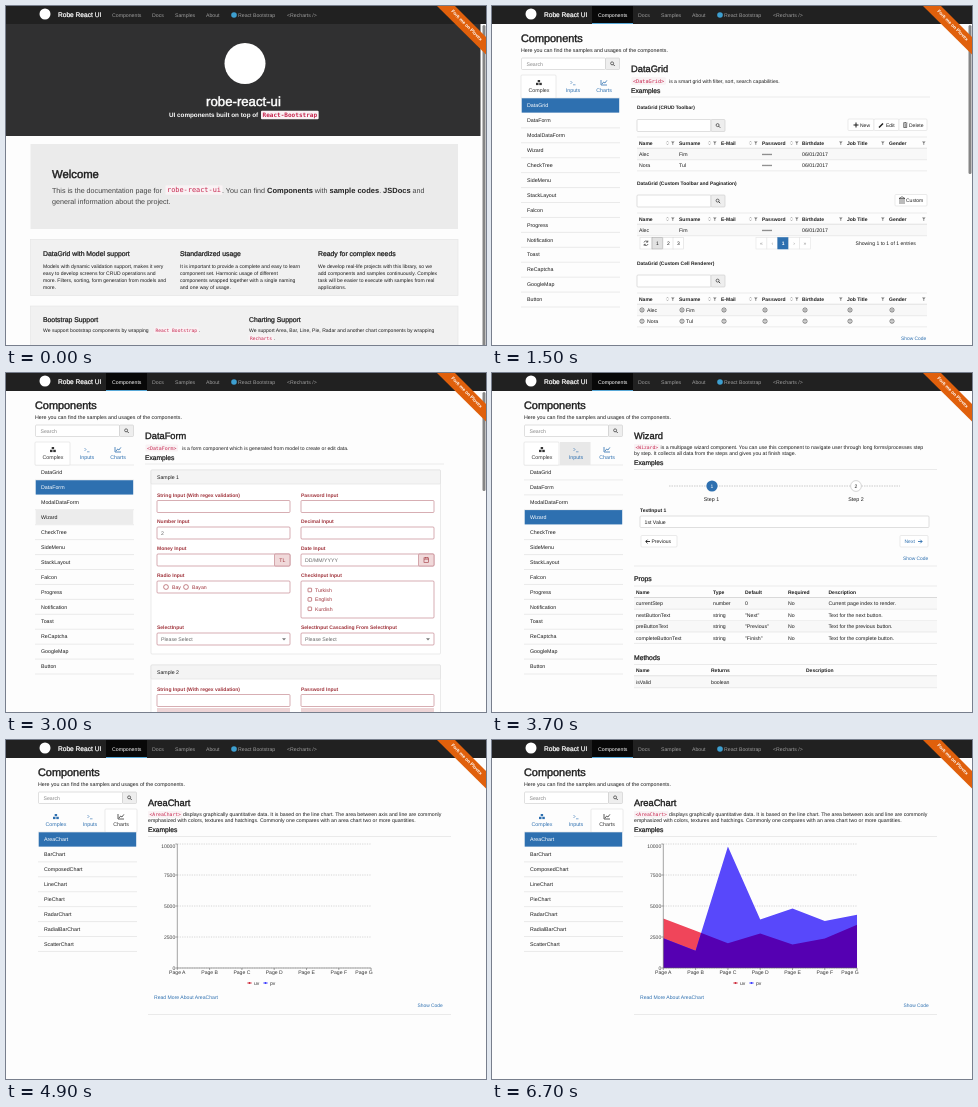
Animation, 480 px wide and 339 px high, one loop 6.8 s. Source, as an HTML page:

```html
<!DOCTYPE html>
<html lang="en">
<head>
<meta charset="utf-8">
<title>Component library tour</title>
<style>
html, body { margin: 0; width: 100%; height: 100%; overflow: hidden; background: #fdfdfd; }
svg { display: block; width: 480px; height: 339px; }
text { font-family: "Liberation Sans", Arial, sans-serif; text-rendering: geometricPrecision; white-space: pre; }
.mono { font-family: "DejaVu Sans Mono", monospace; }
.bold { font-weight: 700; }
.medium { stroke: currentColor; stroke-width: .036em; }
.reveal { animation: reveal 6800ms infinite; }
@keyframes reveal {
  0%, 72.94% { clip-path: inset(0 100% 0 0); animation-timing-function: ease; }
  95%, 100% { clip-path: inset(0 0 0 0); }
}
</style>
</head>
<body>
<svg id="stage" viewBox="0 0 480 339" xmlns="http://www.w3.org/2000/svg"></svg>
<script>
const LOOP = 6800;
const TO_GRID = 1100, TO_FORM = 2500, TO_WIZARD = 3250, TO_CHARTS = 4400, TO_AREA = 4850;
const BLUE = '#2e70b0', RED = '#a0343c', CODE = '#c7254e', INK = '#1c1c1c', RULE = '#ddd';
const rules = [];
const many = (list, fn) => list.map(fn).join('');

// y is the vertical middle of the line
function text(x, y, str, size = 5.2, fill = INK, cls = '', anchor = 'start') {
  const safe = str.replace(/</g, '&lt;').replace(/\[b\](.*?)\[\/b\]/g, '<tspan font-weight="700" font-size="7.5" fill="#222">$1</tspan>');
  return `<text x="${x}" y="${y + size * .35}" font-size="${size}" fill="${fill}" color="${fill}" class="${cls}" text-anchor="${anchor}">${safe}</text>`;
}
const mid = (x, y, str, size, fill, cls) => text(x, y, str, size, fill, cls, 'middle');
const bold = (x, y, str, size = 5, fill = INK) => text(x, y, str, size, fill, 'bold');
const medium = (x, y, str, size, fill = INK) => text(x, y, str, size, fill, 'medium');
function rect(x, y, w, h, fill = '#fff', stroke = 'none', r = 0) {
  return `<rect x="${x}" y="${y}" width="${w}" height="${h}" fill="${fill}" stroke="${stroke}" stroke-width=".6" rx="${r}"/>`;
}
const path = (d, stroke = INK, w = .6, extra = '') =>
  `<path d="${d}" fill="none" stroke="${stroke}" stroke-width="${w}" ${extra}/>`;
const line = (x1, x2, y, stroke = RULE, extra = '') => path(`M${x1} ${y}H${x2}`, stroke, .6, extra);
const dot = (x, y, r, fill, stroke = 'none') =>
  `<circle cx="${x}" cy="${y}" r="${r}" fill="${fill}" stroke="${stroke}" stroke-width=".6"/>`;
function code(x, y, str, size = 4.6, bg = '#f9f2f4', cls = 'mono') {
  const w = str.length * size * .602;
  return rect(x - 1.5, y - size * .7, w + 3, size * 1.4, bg, 'none', 1) + text(x, y, str, size, CODE, cls);
}
const scrollbar = h => rect(476.5, 19, 3, h, '#858585', 'none', 1.5);

// Visible from one time to another within the loop
function during(from, to, body) {
  const name = 'w' + rules.length;
  const pc = t => (t / LOOP * 100).toFixed(3) + '%';
  const start = from ? `0%{visibility:hidden}${pc(from)}{visibility:visible}` : '0%{visibility:visible}';
  const end = to < LOOP ? `${pc(to)},100%{visibility:hidden}` : '100%{visibility:visible}';
  rules.push(`@keyframes ${name}{${start}${end}}.${name}{animation:${name} ${LOOP}ms step-end infinite}`);
  return `<g class="${name}">${body}</g>`;
}

const magnifier = (x, y) => dot(x - .4, y - .4, 1.5, 'none', INK) + path(`M${x + .7} ${y + .7}l1.5 1.5`, INK, .8);
function search(x, y, w, h, hint = '') {
  return rect(x, y, w, h, '#fff', '#ccc', 1) + rect(x + w, y, 14, h, '#eee', '#ccc', 1) +
    magnifier(x + w + 7, y + h / 2) + text(x + 5, y + h / 2, hint, 5.2, '#888');
}
const button = (x, y, w, label, pad, fill = INK) =>
  rect(x, y, w, 11.5, '#fff', '#ddd', 1) + text(x + pad, y + 6, label, 5, fill);

function navbar() {
  const items = [[106, 'Components'], [146, 'Docs'], [169, 'Samples'], [200, 'About'], [232, 'React Bootstrap'], [281, '<Recharts />']];
  return rect(0, 0, 480, 18, '#212121') + dot(39, 8, 5.5, '#fff') +
    medium(52, 8.7, 'Robe React UI', 6.6, '#fff') +
    many(items, ([x, s]) => text(x, 9, s, 5.2, '#9d9d9d')) + dot(228, 9, 2.8, '#3d9fd0') +
    during(TO_GRID, LOOP, rect(100, 0, 41, 18, '#080808') + rect(100, 17, 41, 1, '#58a9d8') + text(106, 9, 'Components', 5.2, '#fff'));
}
const ribbon = () => '<path d="M431 0H449L480 31V48.5Z" fill="#e0600c"/>' +
  '<g transform="translate(460.5 19.5) rotate(45)">' + mid(0, -.5, 'Fork me on Plovex', 4.7, '#fff', 'bold') + '</g>';

function home() {
  const cols = [
    [37, 'DataGrid with Model support', ['Models with dynamic validation support, makes it very', 'easy to develop screens for CRUD operations and', 'more. Filters, sorting, form generation from models and', 'more.']],
    [174, 'Standardized usage', ['It is important to provide a complete and easy to learn', 'component set. Harmonic usage of different', 'components wrapped together with a single naming', 'and one way of usage.']],
    [312, 'Ready for complex needs', ['We develop real-life projects with this library, so we', 'add components and samples continuously. Complex', 'task will be easier to execute with samples from real', 'applications.']]
  ];
  return rect(0, 18, 474.5, 112, '#303031') + dot(239, 57.5, 20.5, '#fff') +
    mid(237.5, 95.5, 'robe-react-ui', 13.2, '#fff', 'medium') +
    bold(163, 109, 'UI components built on top of', 6.3, '#fff') + code(256.5, 109, 'React-Bootstrap', 6.05, '#f9f2f4', 'mono bold') +
    rect(24.5, 138, 427.5, 85, '#ebebeb') + medium(46, 168.5, 'Welcome', 11.3) +
    text(46, 184, 'This is the documentation page for', 7.17, '#444') + code(161, 184, 'robe-react-ui', 6.9) +
    text(216, 184, '. You can find [b]Components[/b] with [b]sample codes[/b]. [b]JSDocs[/b] and', 7.17, '#444') +
    text(46, 195, 'general information about the project.', 7.17, '#444') +
    rect(24.5, 233.5, 427.5, 56, '#f1f1f1', '#e3e3e3') +
    many(cols, ([x, h, ls]) => medium(x, 248, h, 6.85) + many(ls, (s, i) => text(x, 260 + i * 7.1, s, 5.05))) +
    rect(24.5, 300, 427.5, 42, '#f1f1f1', '#e3e3e3') +
    medium(37, 314, 'Bootstrap Support', 6.85) + medium(243, 314, 'Charting Support', 6.85) +
    text(37, 324.5, 'We support bootstrap components by wrapping', 5.05) + code(149.5, 324.5, 'React Bootstrap') + text(193, 324.5, '.', 5.05) +
    text(243, 324.5, 'We support Area, Bar, Line, Pie, Radar and another chart components by wrapping', 5.05) +
    code(244, 332, 'Recharts') + text(268, 332, '.', 5.05) + scrollbar(322);
}

const COMPLEX = ['DataGrid', 'DataForm', 'ModalDataForm', 'Wizard', 'CheckTree', 'SideMenu', 'StackLayout', 'Falcon', 'Progress', 'Notification', 'Toast', 'ReCaptcha', 'GoogleMap', 'Button'];
const CHARTS = ['Area', 'Bar', 'Composed', 'Line', 'Pie', 'Radar', 'RadialBar', 'Scatter'].map(s => s + 'Chart');
const ROW = 14.93;
const rowBox = (x, i, fill) => rect(x + .7, 92.3 + i * ROW, 97.5, ROW - .6, fill);

const tabIcons = [
  (x, c) => rect(x - 1.3, 74, 2.4, 2.2, c) + rect(x - 3, 76.8, 2.5, 2.3, c) + rect(x + .3, 76.8, 2.5, 2.3, c),
  (x, c) => path(`M${x - 2.5} 75l1.5 1.5l-1.5 1.5M${x} 78.8h2.5`, c),
  (x, c) => path(`M${x - 3} 74v5h6M${x - 2} 78l1.7-2l1.2 1l2-2.6`, c, .8)
];
function sidebar(x, items, tab, picked) {
  const left = [0, 35.5, 67], width = [35, 31, 32], centre = [18, 52, 83];
  return medium(x, 31.7, 'Components', 10.9) + text(x, 44, 'Here you can find the samples and usages of the components.', 5.3) +
    search(x + .5, 52, 84, 11.5, 'Search') + line(x, x + 99, 92) +
    rect(x + left[tab], 69, width[tab], 23.2, '#fff', RULE, 1) +
    many(['Complex', 'Inputs', 'Charts'], (s, i) => {
      const c = i === tab ? '#333' : BLUE;
      return tabIcons[i](x + centre[i], c) + mid(x + centre[i], 84, s, 5.3, c);
    }) +
    many(items, (s, i) => (i === picked ? rowBox(x, i, BLUE) : line(x, x + 99, 92 + (i + 1) * ROW)) +
      text(x + 6, 99.3 + i * ROW, s, 5.3, i === picked ? '#fff' : INK));
}

const headline = (x, s) => medium(x, 63, s, 9.3);
const funnel = (x, y) => `<path d="M${x} ${y - 1.5}h3.6l-1.4 1.6v2l-.8-.4v-1.6z" fill="#777"/>`;
const sorter = (x, y) => path(`M${x} ${y - .6}l1-1.2l1 1.2M${x} ${y + .6}l1 1.2l1-1.2`, '#777', .5);
const smiley = (x, y) => dot(x, y, 2.1, 'none', '#333') + dot(x - .7, y - .6, .35, '#333') + dot(x + .7, y - .6, .35, '#333') + path(`M${x - 1} ${y + .5}q1 1 2 0`, '#333', .4);

const COLS = [[147, 'Name'], [187, 'Surname'], [229, 'E-Mail'], [270, 'Password'], [310, 'Birthdate'], [355, 'Job Title'], [397, 'Gender']];
const PEOPLE = [['Alec', 'Fim'], ['Nora', 'Tul']];
function gridTable(y, people, faces) {
  const ends = [183, 225, 266, 307, 351, 393, 434];
  return line(145, 435, y - 6) + line(145, 435, y + 5.3, '#bbb') +
    many(COLS, ([x, s], i) => bold(x, y, s) + funnel(ends[i] - 4, y) + (i < 4 ? sorter(ends[i] - 8.5, y) : '')) +
    many(people, ([first, last], i) => {
      const r = y + 11 + i * 11.2;
      return (i % 2 ? '' : rect(145, r - 5.4, 290, 11, '#f8f8f8')) + line(145, 435, r + 5.7) +
        (faces ? many(COLS, ([x]) => smiley(x + 3, r)) + text(155, r, first) + text(194, r, last)
          : text(147, r, first) + text(187, r, last) + text(270, r + .8, '*****') + text(310, r, '06/01/2017'));
    });
}
function gridPage() {
  return headline(139, 'DataGrid') + code(141, 75, '<DataGrid>', 5.2) +
    text(177, 75, 'is a smart grid with filter, sort, search capabilities.', 5.1) +
    medium(139, 85, 'Examples', 6.7) + line(139, 438, 91) +
    bold(145, 101, 'DataGrid (CRUD Toolbar)', 4.85) + search(145, 113.5, 74, 12) +
    button(356, 113, 26, 'New', 12) + path('M361.5 119h5M364 116.5v5', INK, 1) +
    button(382, 113, 25, 'Edit', 12) + path('M387 121.5l4-4', INK, 1.5) +
    button(407, 113, 28, 'Delete', 10) + path('M411 117h4.4M412.5 116.5h1.4M411.7 117.5v4h3v-4M413.2 118v3') +
    gridTable(137, PEOPLE) +
    bold(145, 177, 'DataGrid (Custom Toolbar and Pagination)', 4.95) + search(145, 189, 74, 12) +
    button(403, 188.5, 32, 'Custom', 11) + path('M407 192.5l3-1.8l3 1.8zM408 193v3M410 193v3M412 193v3M407 197h6') +
    gridTable(213, PEOPLE.slice(0, 1)) +
    many([148, 160, 171, 181], (x, i) => rect(x, 231.5, i ? 10.5 : 12, 11.5, i === 1 ? '#e2e2e2' : '#fff', i === 1 ? '#aaa' : '#ddd') + mid(x + 5.3, 237.3, i ? String(i) : '', 5)) +
    path('M152 236.5a2 2 0 0 1 3.7-.5M156 238a2 2 0 0 1-3.7 .5M155.8 234.5v1.7h-1.7M152.2 240v-1.7h1.7') +
    many(['«', '‹', '1', '›', '»'], (s, i) => rect(264 + i * 10.9, 231.5, 10.9, 11.5, i === 2 ? BLUE : '#fff', i === 2 ? BLUE : '#e5e5e5') +
      mid(269.4 + i * 10.9, 237.2, s, 5, i === 2 ? '#fff' : '#888', i === 2 ? 'bold' : '')) +
    text(363.5, 237, 'Showing 1 to 1 of 1 entries', 5.1) +
    bold(145, 257, 'DataGrid (Custom Cell Renderer)', 4.95) + search(145, 269, 74, 12) +
    gridTable(293, PEOPLE, true) + text(409, 332, 'Show Code', 4.9, BLUE) + scrollbar(149);
}

function field(x, y, label, value = '', addon = '') {
  const w = 133;
  return bold(x, y, label, 5, RED) + rect(x, y + 5.5, w, 12, '#fff', '#bd7880', 1) + text(x + 4, y + 11.7, value, 5.2, '#666') +
    (addon ? rect(x + w - 15.5, y + 5.5, 15.5, 12, '#f0d9da', '#bd7880', 1) : '') + (addon === 'TL' ? mid(x + w - 7.7, y + 11.7, 'TL', 5.2, RED) : '');
}
function formPage() {
  const L = 151, R = 295;
  const caret = x => `<path d="M${x} 265.2h4l-2 2.4z" fill="#777"/>`;
  const sample = (y, h, s) => rect(145, y, 289.5, h, '#fff', RULE, 1) + rect(145, y, 289.5, 14, '#f4f4f4', RULE, 1) + text(151, y + 7.2, s);
  return headline(139, 'DataForm') + code(141, 75, '<DataForm>', 4.9) +
    text(176, 75, 'is a form component which is generated from model to create or edit data.', 5.1) +
    medium(139, 85, 'Examples', 6.7) + line(139, 438, 91) +
    sample(97, 184, 'Sample 1') +
    field(L, 122, 'String Input (With regex validation)') + field(R, 122, 'Password Input') +
    field(L, 148.5, 'Number Input', '2') + field(R, 148.5, 'Decimal Input') +
    field(L, 175.5, 'Money Input', '', 'TL') + field(R, 175.5, 'Date Input', 'DD/MM/YYYY', 'cal') +
    rect(418, 184.8, 4.6, 4.6, 'none', RED) + path('M418 186.2h4.6M419.5 184v1.5M421.2 184v1.5', RED) +
    field(L, 202.5, 'Radio Input') + dot(160, 214, 2.4, '#fff', RED) + text(166, 214, 'Bay', 5.2, RED) + dot(180, 214, 2.4, '#fff', RED) + text(186, 214, 'Bayan', 5.2, RED) +
    bold(R, 202.5, 'CheckInput Input', 5, RED) + rect(R, 208, 133, 37, '#fff', '#bd7880', 1) +
    many(['Turkish', 'English', 'Kurdish'], (s, i) => rect(302, 215.2 + i * 9.4, 3.6, 3.6, '#fff', RED, .5) + text(309, 217 + i * 9.4, s, 5.2, RED)) +
    field(L, 254.5, 'SelectInput', 'Please Select') + field(R, 254.5, 'SelectInput Cascading From SelectInput', 'Please Select') + caret(276) + caret(420) +
    sample(292, 60, 'Sample 2') +
    field(L, 316, 'String Input (With regex validation)') + field(R, 316, 'Password Input') +
    rect(L, 335, 133, 5, '#edd4d6') + rect(R, 335, 133, 5, '#edd4d6') + scrollbar(99);
}

function table(y, xs, head, rows) {
  return line(142, 445, y - 6) + many(head, (s, i) => bold(xs[i], y, s)) + line(142, 445, y + 5.5, '#bbb') +
    many(rows, (row, r) => {
      const cy = y + 11.5 + r * 11.4;
      return (r % 2 ? '' : rect(142, cy - 5.6, 303, 11.2, '#f8f8f8')) + many(row, (s, i) => text(xs[i], cy, s)) + line(142, 445, cy + 5.7);
    });
}
function wizardPage() {
  return headline(142, 'Wizard') + code(143.5, 74.3, '<Wizard>', 4.7) +
    text(168.5, 74.3, 'is a multipage wizard component. You can use this component to navigate user through long forms/processes step') +
    text(142, 80.5, 'by step. It collects all data from the steps and gives you at finish stage.') +
    medium(142, 90, 'Examples', 6.7) + line(142, 445, 96.5) +
    line(177, 408, 113, '#aaa', 'stroke-dasharray="1.5 1"') +
    dot(220, 113, 5.6, BLUE) + mid(220, 113, '1', 5, '#fff') + dot(364, 113, 5.4, '#fff', '#bbb') + mid(364, 113, '2', 5) +
    mid(219.5, 126, 'Step 1', 5.3) + mid(364, 126, 'Step 2', 5.3) +
    bold(148, 137, 'TextInput 1') + rect(148, 143, 289, 11.5, '#fff', '#ccc', 1) + text(152.5, 149, '1st Value') +
    button(149, 162.5, 36, 'Previous', 10.5) + path('M158 168.5h-4M155.5 166.7l-1.8 1.8l1.8 1.8', INK, .9) +
    button(408, 162.5, 28, 'Next', 4.5, BLUE) + path('M426 168.5h4M428.3 166.7l1.8 1.8l-1.8 1.8', BLUE, .9) +
    text(411, 185, 'Show Code', 4.9, BLUE) + line(142, 445, 193) +
    medium(142, 206, 'Props', 6.8) +
    table(219, [144, 221, 253, 296, 336.5], ['Name', 'Type', 'Default', 'Required', 'Description'], [
      ['currentStep', 'number', '0', 'No', 'Current page index to render.'],
      ['nextButtonText', 'string', '"Next"', 'No', 'Text for the next button.'],
      ['preButtonText', 'string', '"Previous"', 'No', 'Text for the previous button.'],
      ['completeButtonText', 'string', '"Finish"', 'No', 'Text for the complete button.']]) +
    medium(142, 285, 'Methods', 6.8) +
    table(297.5, [144, 219, 314], ['Name', 'Returns', 'Description'], [['isValid', 'boolean']]);
}

function chartPage() {
  const X0 = 171.3, STEP = 32.3, BASE = 228, SCALE = 124 / 10000;
  const X1 = X0 + STEP * 6;
  const area = data => `M${X0} ${BASE}` + many(data, (v, i) => `L${(X0 + i * STEP).toFixed(1)} ${(BASE - v * SCALE).toFixed(1)}`) + `V${BASE}Z`;
  const uv = area([4000, 3000, 2000, 2780, 1890, 2390, 3490]);
  const pv = area([2400, 1398, 9800, 3908, 4800, 3800, 4300]);
  const legend = (x, s, c) => line(x, x + 5, 243, c) + dot(x + 2.5, 243, 1.1, c) + text(x + 7, 243, s, 5, '#333');
  const tip = dot(X0, BASE - 4000 * SCALE, 1.4, '#f00', '#fff') + dot(X0, BASE - 2400 * SCALE, 1.4, '#33f', '#fff') +
    rect(175, 163.5, 29.5, 35.5, '#fff', '#ccc') + text(179, 171, 'Page A', 5.1) +
    text(179, 180, 'uv : 4000', 5.1, '#f00') + text(179, 190, 'pv : 2400', 5.1, '#00f');
  return headline(142, 'AreaChart') + code(143.5, 74.3, '<AreaChart>', 4.75) +
    text(177, 74.3, 'displays graphically quantitative data. It is based on the line chart. The area between axis and line are commonly') +
    text(142, 80.5, 'emphasized with colors, textures and hatchings. Commonly one compares with an area chart two or more quantities.') +
    medium(142, 90, 'Examples', 6.7) + line(142, 445, 96.5) +
    many([10000, 7500, 5000, 2500, 0], (v, i) => {
      const y = BASE - v * SCALE;
      return line(X0, X1, y, '#bbb', 'stroke-dasharray="1.2 1.2"') + line(X0 - 2, X0, y, '#666') + text(169.3, y + (i ? 0 : 2), String(v), 5.1, '#444', '', 'end');
    }) +
    `<clipPath id="under"><path d="${uv}"/></clipPath>` +
    `<g class="reveal"><path d="${uv}" fill="#f0455a"/><path d="${pv}" fill="#5848fb"/><path d="${pv}" fill="#5500b2" clip-path="url(#under)"/></g>` +
    path(`M${X0} 104V${BASE}H${X1}`, '#666') +
    many([...'ABCDEFG'], (c, i) => path(`M${X0 + i * STEP} ${BASE}v2`, '#666') +
      mid(Math.min(X0 + i * STEP, 358), 232.7, 'Page ' + c, 5.1, '#333')) +
    legend(241, 'uv', '#c23') + legend(257, 'pv', '#33f') +
    text(148, 257.5, 'Read More About AreaChart', 5.1, BLUE) + text(411.5, 265, 'Show Code', 4.9, BLUE) +
    line(142, 445, 274.5) + during(5700, 6350, tip);
}

const hoverRow = (x, i, s) => rowBox(x, i, '#ececec') + text(x + 6, 99.3 + i * ROW, s, 5.3);
const hoverTab = rect(68, 69, 30.5, 23, '#e8e8e8') + tabIcons[1](84, BLUE) + mid(84, 84, 'Inputs', 5.3, BLUE);

const body = [
  during(0, TO_GRID, home()),
  during(TO_GRID, TO_FORM, sidebar(29, COMPLEX, 0, 0) + gridPage()),
  during(TO_FORM, TO_WIZARD, sidebar(29, COMPLEX, 0, 1) + formPage()),
  during(2900, TO_WIZARD, hoverRow(29, 3, 'Wizard')),
  during(TO_WIZARD, TO_CHARTS, sidebar(32, COMPLEX, 0, 3)),
  during(3600, 3950, hoverTab),
  during(TO_WIZARD, TO_AREA, wizardPage()),
  during(TO_CHARTS, TO_AREA, sidebar(32, CHARTS, 2, -1)),
  during(TO_AREA, LOOP, sidebar(32, CHARTS, 2, 0) + chartPage()),
  navbar(), ribbon()
];
document.querySelector('style').append(rules.join('\n'));
document.getElementById('stage').innerHTML = rect(0, 0, 480, 339, '#fdfdfd') + body.join('');
</script>
</body>
</html>
```
